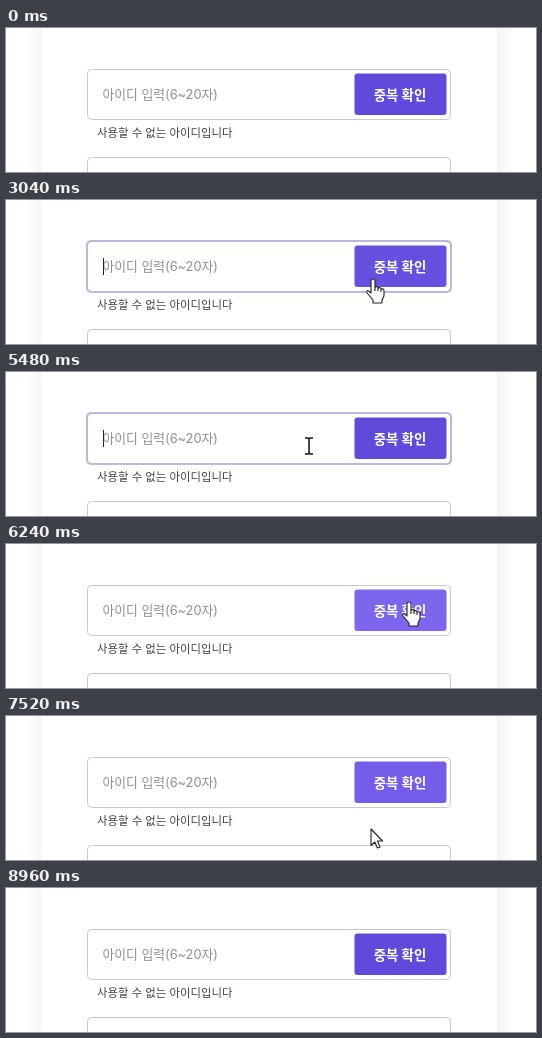
These frames come from a looping animation (530x144 px, 9 s). An HTML page:

```html
<!DOCTYPE html>
<html lang="ko">
<head>
<meta charset="utf-8">
<style>
html, body { margin: 0; width: 100%; height: 100%; overflow: hidden; background: #fff; }
svg { display: block; width: 100%; height: 100%; }
text { font-family: Inter, "Noto Sans CJK KR", "Noto Sans CJK", sans-serif; }
.pointer { fill: #fff; stroke: #222; stroke-width: 1.1; stroke-linejoin: round; }
</style>
</head>
<body>
<svg viewBox="0 0 530 144" preserveAspectRatio="xMinYMin">
  <defs>
    <linearGradient id="left"><stop stop-color="#fff"/><stop offset="1" stop-color="#f6f6f6"/></linearGradient>
    <linearGradient id="right"><stop stop-color="#f4f4f4"/><stop offset="1" stop-color="#fff"/></linearGradient>
  </defs>
  <rect x="20" width="16" height="144" fill="url(#left)"/>
  <rect x="491" width="17" height="144" fill="url(#right)"/>
  <g fill="none" stroke="#c9c9c9">
    <rect x="81.5" y="41.5" width="363" height="50" rx="4"/>
    <path d="M81.5 144V133.5q0-4 4-4h355q4 0 4 4V144"/>
  </g>
  <rect id="ring" x="81" y="41" width="364" height="51" rx="4" fill="none" stroke="#bdb7dc" stroke-width="2"/>
  <text x="96.5" y="71" font-size="12.8" fill="#909090">아이디 입력(6~20자)</text>
  <path id="caret" d="M97.5 58v17" stroke="#222"/>
  <text x="91" y="108.5" font-size="11.4" fill="#444">사용할 수 없는 아이디입니다</text>
  <rect id="button" x="348.5" y="45.5" width="92" height="41.5" rx="3"/>
  <text x="394" y="71.5" font-size="13.4" font-weight="700" fill="#fff" text-anchor="middle">중복 확인</text>
  <g id="pointers">
    <path id="arrow" class="pointer" d="M0 0V16.5L3.8 13L6.4 19L9 17.9L6.4 12H11.6Z"/>
    <g id="hand" class="pointer">
      <path d="M-2 2Q-2 0 0 0T2 2V8Q5 7 5 9Q8 8 8 10Q11 9 11 12V17L9 21V24H0V21L-6 14Q-7 12-5 11.6L-2 14Z"/>
      <path d="M2 8v4M5 9v3M8 10v3" fill="none"/>
    </g>
    <g id="beam" fill="none">
      <path d="M-4-8h3l1 1l1-1h3M0-7v14M-4 8h3l1-1l1 1h3" stroke="#fff" stroke-width="3"/>
      <path d="M-4-8h3l1 1l1-1h3M0-7v14M-4 8h3l1-1l1 1h3" stroke="#111" stroke-width="1.5"/>
    </g>
  </g>
</svg>
<script>
const LOOP = 9000, STEP = 40, GLIDE = 640, FADE = 200, BLINK = 533;
const SHOW = 1160, HIDE = 8960, FOCUS = 1900, BLUR = 5960;
const el = id => document.getElementById(id);

// Each glide sets off at a time towards a place and slows down on arrival
const start = { x: 50, y: 120 };
const glides = [
  { at: SHOW, x: 156, y: 73 },
  { at: 2640, x: 402, y: 80 },
  { at: 3920, x: 251, y: 82 },
  { at: 5360, x: 403, y: 58 },
  { at: 6240, x: 471, y: 45 },
  { at: 6840, x: 372, y: 70 },
  { at: 7440, x: 365, y: 113 },
  { at: 7520, x: 432, y: 80 },
  { at: 8120, x: 452, y: 111 }
];

function pointerAt(t) {
  if (t < SHOW || t >= HIDE) return null;
  const i = glides.findLastIndex(g => g.at <= t);
  const from = glides[i - 1] || start, to = glides[i], next = glides[i + 1];
  const time = Math.min(GLIDE, (next ? next.at : HIDE) - to.at);
  const u = Math.min(1, (t - to.at) / time), ease = u * (2 - u);
  return { x: from.x + (to.x - from.x) * ease, y: from.y + (to.y - from.y) * ease };
}

const inside = (p, l, t, r, b) => p && p.x >= l && p.x <= r && p.y >= t && p.y <= b;
const onButton = p => inside(p, 349, 46, 440, 87);
const onField = p => inside(p, 82, 41, 445, 92);

// Button highlight level for every 10 ms of the loop
const highlight = [];
for (let t = 0, level = 0; t < LOOP; t += 10) {
  const change = (onButton(pointerAt(t)) ? 10 : -10) / FADE;
  highlight.push(level = Math.max(0, Math.min(1, level + change)));
}

const mix = (a, b, u) => `rgb(${a.map((v, i) => Math.round(v + (b[i] - v) * u))})`;
const show = (id, on) => el(id).setAttribute("visibility", on ? "visible" : "hidden");

function draw(now) {
  const t = Math.floor(now % LOOP / STEP) * STEP;
  const p = pointerAt(t);
  const focused = t >= FOCUS && t < BLUR;
  const level = highlight[t / 10];
  show("ring", focused);
  show("caret", focused && Math.floor((t - FOCUS) / BLINK) % 2 === 0);
  el("button").setAttribute("fill", mix([96, 74, 220], [125, 101, 238], level * level * (3 - 2 * level)));
  const shape = !p ? "" : onButton(p) ? "hand" : onField(p) ? "beam" : "arrow";
  for (const id of ["arrow", "hand", "beam"]) show(id, id === shape);
  if (p) el("pointers").setAttribute("transform", `translate(${Math.round(p.x)} ${Math.round(p.y)})`);
  requestAnimationFrame(draw);
}
requestAnimationFrame(draw);
</script>
</body>
</html>
```
